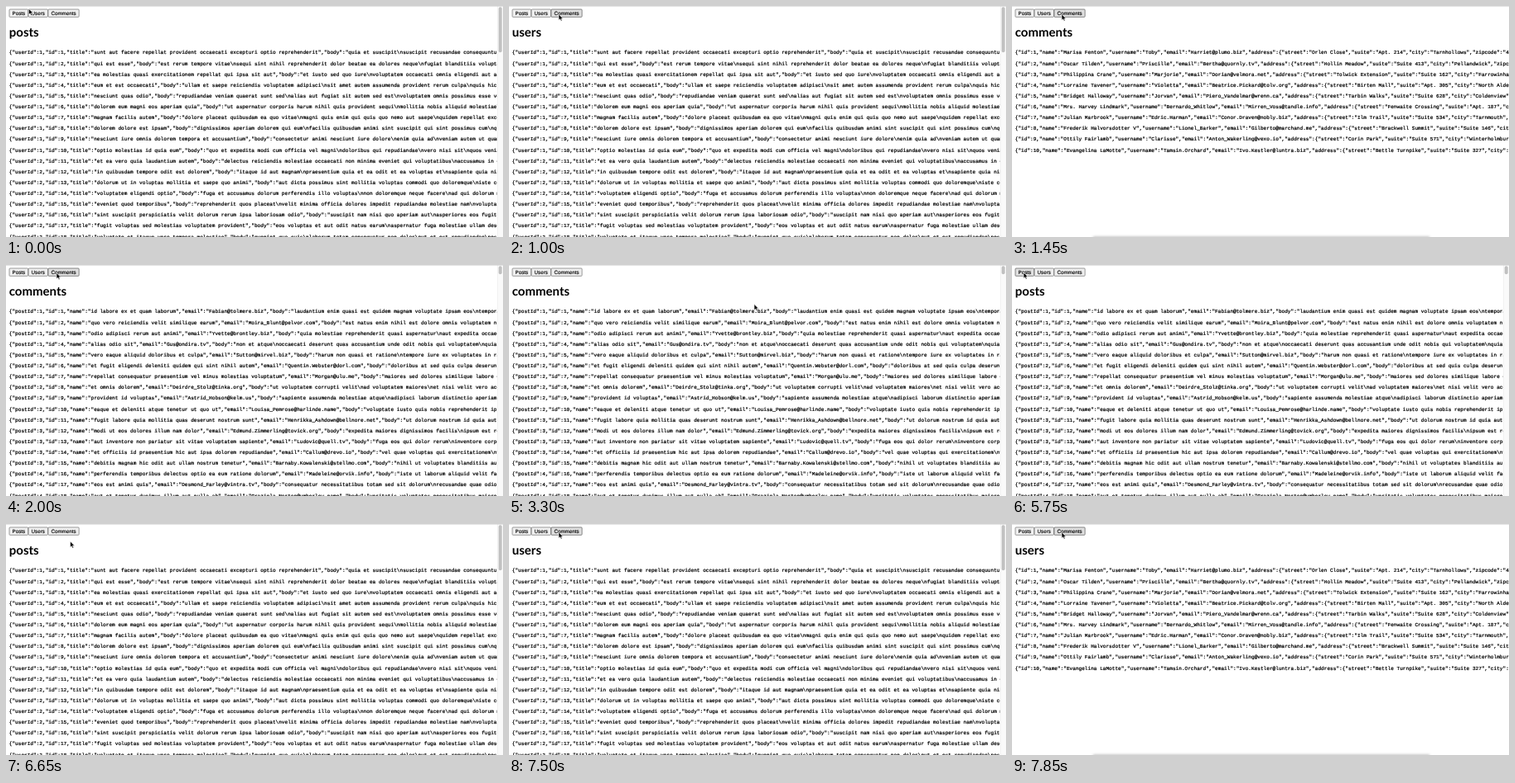
Animation of 600 by 280 pixels, one loop 8000 ms. Source, as an HTML page:

```html
<!DOCTYPE html>
<html lang="en">
<head>
<meta charset="utf-8">
<title>Tabs</title>
<style>
html, body { margin: 0; width: 100%; height: 100%; overflow: hidden; background: #fff; }
svg { display: block; width: 600px; height: 280px; text-rendering: geometricPrecision; }
.row { font: 13px "Liberation Mono", monospace; white-space: pre; stroke: #000; stroke-width: .45; }
.title { font: bold 32px Lato, sans-serif; }
.label { font: 13.333px "Liberation Sans", sans-serif; text-anchor: middle; stroke: #000; stroke-width: .3; }
</style>
</head>
<body>
<svg id="stage" viewBox="0 0 600 280">
  <defs>
    <filter id="soft" x="-10%" y="-300%" width="120%" height="700%"><feGaussianBlur stdDeviation="1.5"/></filter>
  </defs>
  <rect width="600" height="280" fill="#fff"/>
  <g id="page" transform="scale(.46875)">
    <text id="title" class="title" x="8" y="79.5"></text>
  </g>
  <rect id="shade" x="98" y="279.5" width="406" height="4" fill="#bbb" filter="url(#soft)"/>
  <g id="bar">
    <rect x="593" width="7" height="280" fill="#fafafa"/>
    <rect x="593" width=".5" height="280" fill="#e8e8e8"/>
    <rect id="thumb" x="594.7" y="1.3" width="4" rx="2" fill="#c1c1c1"/>
  </g>
  <rect width="600" height=".5" fill="#c8c8c8"/>
  <path id="cursor" d="M0 0V7.2L1.7 5.7L2.8 8.2L4.1 7.6L3 5.2H5.2Z" fill="#000" stroke="#fff" stroke-width=".6" stroke-linejoin="round"/>
</svg>
<script>
const NS = 'http://www.w3.org/2000/svg';
const SCALE = 0.46875, LOOP = 8000, STEP = 50;
const $ = id => document.getElementById(id);

function add(parent, tag, attrs, text = '') {
  const el = document.createElementNS(NS, tag);
  for (const key in attrs) el.setAttribute(key, attrs[key]);
  el.textContent = text;
  return parent.appendChild(el);
}

// One record per line, fields split by "|", "/" is a line break in a body.
const parse = (text, make) => text.trim().split('\n')
  .map((line, i) => JSON.stringify(make(line.replaceAll('/', '\n').split('|'), i + 1)).slice(0, 168));

const posts = parse(`
sunt aut facere repellat provident occaecati excepturi optio reprehenderit|quia et suscipit/suscipit recusandae consequuntur expedita
qui est esse|est rerum tempore vitae/sequi sint nihil reprehenderit dolor beatae ea dolores neque/fugiat blanditiis voluptate porro
ea molestias quasi exercitationem repellat qui ipsa sit aut|et iusto sed quo iure/voluptatem occaecati omnis eligendi aut ad/voluptatem
eum et est occaecati|ullam et saepe reiciendis voluptatem adipisci/sit amet autem assumenda provident rerum culpa/quis hic commodi nesciunt
nesciunt quas odio|repudiandae veniam quaerat sunt sed/alias aut fugiat sit autem sed est/voluptatem omnis possimus esse voluptatibus quis
dolorem eum magni eos aperiam quia|ut aspernatur corporis harum nihil quis provident sequi/mollitia nobis aliquid molestiae/perspiciatis
magnam facilis autem|dolore placeat quibusdam ea quo vitae/magni quis enim qui quis quo nemo aut saepe/quidem repellat excepturi ut quia
dolorem dolore est ipsam|dignissimos aperiam dolorem qui eum/facilis quibusdam animi sint suscipit qui sint possimus cum/quaerat magni
nesciunt iure omnis dolorem tempora et accusantium|consectetur animi nesciunt iure dolore/enim quia ad/veniam autem ut quam aut nobis
optio molestias id quia eum|quo et expedita modi cum officia vel magni/doloribus qui repudiandae/vero nisi sit/quos veniam quod sed accusamus
et ea vero quia laudantium autem|delectus reiciendis molestiae occaecati non minima eveniet qui voluptatibus/accusamus in eum beatae sit
in quibusdam tempore odit est dolorem|itaque id aut magnam/praesentium quia et ea odit et ea voluptas et/sapiente quia nihil amet
dolorum ut in voluptas mollitia et saepe quo animi|aut dicta possimus sint mollitia voluptas commodi quo doloremque/iste corrupti reiciendis
voluptatem eligendi optio|fuga et accusamus dolorum perferendis illo voluptas/non doloremque neque facere/ad qui dolorum molestiae
eveniet quod temporibus|reprehenderit quos placeat/velit minima officia dolores impedit repudiandae molestiae nam/voluptas recusandae
sint suscipit perspiciatis velit dolorum rerum ipsa laboriosam odio|suscipit nam nisi quo aperiam aut/asperiores eos fugit maiores
fugit voluptas sed molestias voluptatem provident|eos voluptas et aut odit natus earum/aspernatur fuga molestiae ullam deserunt
voluptate et itaque vero tempora molestiae|eveniet quo quis/laborum totam consequatur non dolor/ut et est repudiandae/est voluptatem
`, ([title, body], id) => ({ userId: Math.ceil(id / 10), id, title, body }));

const comments = parse(`
id labore ex et quam laborum|Fabian@tolmere.biz|laudantium enim quasi est quidem magnam voluptate ipsam eos/tempora quo necessitatibus
quo vero reiciendis velit similique earum|Moira_Blunt@pelvor.com|est natus enim nihil est dolore omnis voluptatem numquam/et omnis
odio adipisci rerum aut animi|Yvette@brontley.biz|quia molestiae reprehenderit quasi aspernatur/aut expedita occaecati aliquam eveniet
alias odio sit|Gus@ondira.tv|non et atque/occaecati deserunt quas accusantium unde odit nobis qui voluptatem/quia voluptas consequuntur
vero eaque aliquid doloribus et culpa|Sutton@mirvel.biz|harum non quasi et ratione/tempore iure ex voluptates in ratione/harum
et fugit eligendi deleniti quidem qui sint nihil autem|Quentin.Webster@dorl.com|doloribus at sed quis culpa deserunt consectetur qui
repellat consequatur praesentium vel minus molestias voluptatum|Morgan@ulu.me|maiores sed dolores similique labore et inventore et
et omnis dolorem|Deirdre_Stolz@tinka.org|ut voluptatem corrupti velit/ad voluptatem maiores/et nisi velit vero accusamus maiores
provident id voluptas|Astrid_Hobson@kelm.us|sapiente assumenda molestiae atque/adipisci laborum distinctio aperiam et ab ut omnis
eaque et deleniti atque tenetur ut quo ut|Louisa_Pemrose@harlinde.name|voluptate iusto quis nobis reprehenderit ipsum amet nulla
fugit labore quia mollitia quas deserunt nostrum sunt|Henrikka_Ashdown@bellnore.net|ut dolorum nostrum id quia aut est/fuga est
modi ut eos dolores illum nam dolor|Edmund.Zimmerling@tovick.org|expedita maiores dignissimos facilis/ipsum est rem est fugit velit
aut inventore non pariatur sit vitae voluptatem sapiente|Ludovic@quell.tv|fuga eos qui dolor rerum/inventore corporis exercitationem
et officiis id praesentium hic aut ipsa dolorem repudiandae|Callum@drevo.io|vel quae voluptas qui exercitationem/voluptatibus unde sed
debitis magnam hic odit aut ullam nostrum tenetur|Barnaby.Kowalenski@stellmo.com|nihil ut voluptates blanditiis autem odio dicta
perferendis temporibus delectus optio ea eum ratione dolorum|Madeleine@orvik.info|iste ut laborum aliquid velit facere itaque
eos est animi quis|Desmond_Farley@vintra.tv|consequatur necessitatibus totam sed sit dolorum/recusandae quae odio excepturi voluptatum
aut et tenetur ducimus illum aut nulla ab|Graziela_Norton@umberley.name|veritatis voluptates necessitatibus maiores corrupti/neque
`, ([name, email, body], id) => ({ postId: Math.ceil(id / 5), id, name, email, body }));

const users = parse(`
Marisa Fenton|Toby|Harriet@plumo.biz|Orlen Close|Apt. 214|Tarnhollows
Oscar Tilden|Priscille|Bertha@quornly.tv|Hollin Meadow|Suite 413|Pellandwick
Philippina Crane|Marjorie|Dorian@velmora.net|Tolwick Extension|Suite 162|Farrowinhaven
Lorraine Tavener|Violetta|Beatrice.Pickard@tolv.org|Birten Mall|Apt. 305|North Alder
Bridget Halloway|Jorvan|Piero_Vandelmar@wrenn.ca|Tarbin Walks|Suite 628|Coldenview
Mrs. Harvey Lindmark|Bernardo_Whitlow|Mirren_Voss@tandle.info|Fenwaite Crossing|Apt. 187|North Brindle
Julian Marbrook|Edric.Harman|Conor.Draven@nobly.biz|Ilm Trail|Suite 534|Tarnmouth
Frederik Halvorsdotter V|Lionel_Barker|Gilberto@marchand.me|Brackwell Summit|Suite 146|Merryview
Ottily Fairlamb|Clarisse|Anton_Wakerling@vexo.io|Corin Park|Suite 571|Winterholmbury
Evangelina LaMotte|Tamsin.Orchard|Ivo.Kestler@luntra.biz|Bettle Turnpike|Suite 327|Tillockbury
`, ([name, username, email, street, suite, city], id) =>
  ({ id, name, username, email, address: { street, suite, city, zipcode: '48210' } }));

const lists = { posts, users, comments };
const thumbs = { posts: 55, comments: 10 };

// Each entry holds from its time until the next one.
const titles = [[0, 'posts'], [700, 'users'], [1450, 'comments'], [5550, 'posts'], [7200, 'users']];
const loaded = [[0, 'posts'], [1100, 'users'], [2000, 'comments'], [6050, 'posts'], [7700, 'users']];
const presses = [[600, 700], [1300, 1450], [5450, 5550], [7100, 7200]];

// Pointer: time, x, y
const path = [
  [0, 27.4, 3.3], [200, 36, 5.5], [700, 36, 5.5], [1000, 60, 10], [1450, 60, 10], [1650, 61, 9.6], [2100, 61, 9.6],
  [2600, 546, 155], [2950, 513, 90], [3150, 400, 2], [3300, 296, 47.5], [3400, 271, 99], [3500, 271, 99],
  [3900, 150, 62], [4250, 56, 75], [4500, 62, 89], [4700, 101, 62], [4850, 98, 43.5], [5200, 38, 16],
  [5400, 14, 9], [5900, 14, 9], [6350, 60, 30], [6650, 77.5, 21], [6750, 77.5, 21],
  [7050, 38, 9], [7250, 38, 9], [7500, 60, 10], [LOOP, 60, 10]
];

const at = (track, t) => track.filter(([start]) => start <= t).pop()[1];

// Hermite slope; a pause or a turn gives zero.
function slope(i, axis) {
  const a = path[i - 1], b = path[i], c = path[i + 1];
  if (!a || !c) return 0;
  const before = (b[axis] - a[axis]) / (b[0] - a[0]);
  const after = (c[axis] - b[axis]) / (c[0] - b[0]);
  return before * after > 0 ? 2 * before * after / (before + after) : 0;
}

function pointer(t) {
  const i = Math.max(0, path.findIndex(k => k[0] > t) - 1);
  const a = path[i], b = path[i + 1];
  const d = b[0] - a[0], u = (t - a[0]) / d, v = 1 - u;
  return [1, 2].map(axis =>
    a[axis] * (1 + 2 * u) * v * v + b[axis] * u * u * (3 - 2 * u) +
    d * u * v * (v * slope(i, axis) - u * slope(i + 1, axis)));
}

const page = $('page');
let left = 8;
const buttons = [['Posts', 49.3], ['Users', 50.8], ['Comments', 80.4]].map(([label, width]) => {
  const box = add(page, 'rect', { x: left + .5, y: 8.5, width: width - 1, height: 20, rx: 2, 'stroke-width': 1.4 });
  add(page, 'text', { class: 'label', x: left + width / 2, y: 23.3 }, label);
  const button = { box, left, right: left + width };
  left += width;
  return button;
});
const rows = posts.map((_, i) => add(page, 'text', { class: 'row', x: 8, y: 124.6 + 28 * i }));

let shown;
function showList(name) {
  if (name === shown) return;
  shown = name;
  rows.forEach((row, i) => { row.textContent = lists[name][i] || ''; });
  const scrolls = name in thumbs;
  $('bar').style.display = scrolls ? '' : 'none';
  $('shade').style.display = scrolls ? 'none' : '';
  if (scrolls) $('thumb').setAttribute('height', thumbs[name]);
}

function draw(t) {
  const [x, y] = pointer(t);
  const px = x / SCALE, py = y / SCALE;
  const down = presses.some(([from, to]) => t >= from && t < to);
  for (const { box, left, right } of buttons) {
    const over = px >= left && px < right && py >= 8 && py < 29;
    box.setAttribute('fill', !over ? '#efefef' : down ? '#f5f5f5' : '#dfdfdf');
    box.setAttribute('stroke', over && !down ? '#4f4f4f' : '#6a6a6a');
  }
  $('title').textContent = at(titles, t);
  showList(at(loaded, t));
  $('cursor').setAttribute('transform', `translate(${x} ${y})`);
}

const start = performance.now();
function tick() {
  const t = (performance.now() - start) % LOOP;
  draw(t - t % STEP);
  requestAnimationFrame(tick);
}
tick();
</script>
</body>
</html>
```
